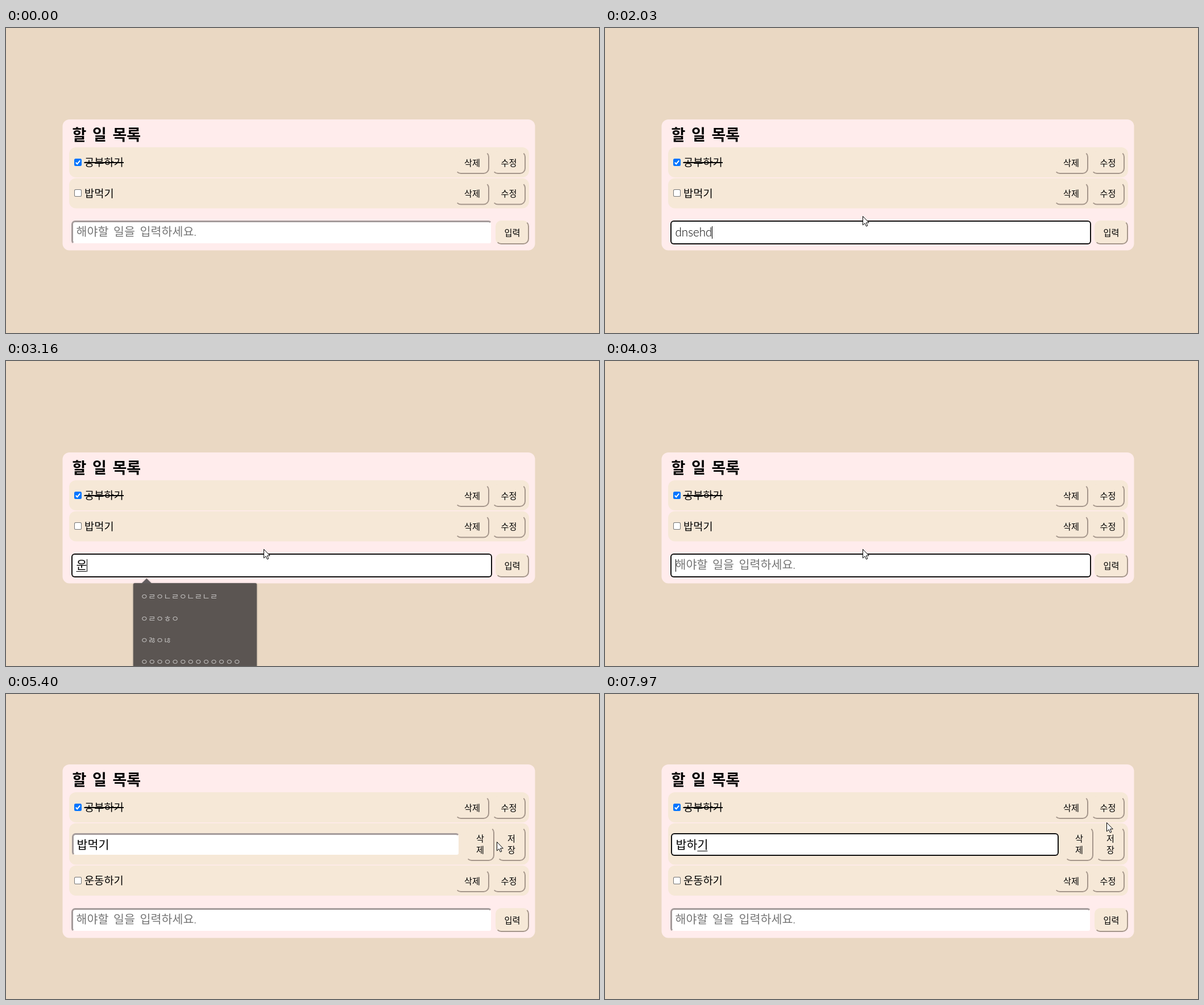
An HTML page with a canvas for the animation above (8 s loop, 1043 by 537 pixels).

```html
<!DOCTYPE html>
<html lang="ko">
<head>
<meta charset="utf-8">
<title>할 일 목록</title>
<style>
html, body { margin: 0; width: 100%; height: 100%; overflow: hidden; background: #ead8c3; }
canvas { display: block; }
</style>
</head>
<body>
<canvas id="stage" width="1043" height="537"></canvas>
<script>
const ctx = document.getElementById('stage').getContext('2d');
const LOOP = 8000;
const HANGUL = '"Noto Sans CJK KR", "Noto Sans CJK JP", "Noto Sans CJK", sans-serif';
const PAPER = '#f6e8d7', SHADE = '#a5968b', INK = '#000';

// [time, text, composing last syllable, caret hidden]
const newTask = [
  [940, ''], [1665, 'dn'], [1740, 'dns'], [1830, 'dnse'], [1900, 'dnseh'], [2030, 'dnsehd'],
  [2290, 'dnseh'], [2360, 'dnse'], [2430, 'dns'], [2500, 'dn'], [2570, 'd'], [2692, '', false, true],
  [2860, 'ㅇ', true], [2990, '우', true], [3092, '운', true], [3300, '운ㄷ', true], [3430, '운도', true],
  [3560, '운동', true], [3660, '운동ㅎ', true], [3740, '운동하', true], [3820, '운동학', true],
  [3900, '운동하기', true], [4025, '']
];
const rename = [
  [5395, '밥먹기'], [6300, '밥먹기'], [6830, '밥먹'], [6900, '밥'],
  [7170, '밥ㅎ', true], [7270, '밥하', true], [7370, '밥하기', true]
];
const BLUR = 5330, ADD = 4160, EDIT = 5395, REFOCUS = 6230;

// [open, close, fade in, fade out, width, entries]
const latin = ['dfdf', 'dfdff', 'dgdg', 'dghfgfdgdg'];
const jamo = ['ㅇㄹㅇㄴㄹㅇㄴㄹㄴㄹ', 'ㅇㄹㅇㅎㅇ', 'ㅇㅀㅇㄶ', 'ㅇ'.repeat(13)];
const recent = ['공부하기', '밥먹기', 'ㅇㄹㅇㅎㅇ', 'ㅇㄹㅇㄴㄹㅇㄴㄹㄴㄹ'];
const popups = [
  [1000, 1663, 200, 1, 184, recent],
  [1664, 1700, 1, 200, 116, latin],
  [2570, 2692, 100, 200, 116, latin],
  [2860, 3092, 150, 200, 221, jamo]
];

const pointer = [
  [70, 762, 487], [470, 409, 367], [940, 409, 367], [1200, 453, 331], [4560, 453, 331],
  [5330, 863, 260], [5410, 863, 260], [6020, 780, 264], [7780, 780, 264], [7960, 882, 226]
];

function box(x, y, w, h, r, fill) {
  ctx.beginPath();
  ctx.roundRect(x, y, w, h, r);
  ctx.fillStyle = fill;
  ctx.fill();
}

// Strokes two sides of a rounded box, clockwise from the middle of a corner (0 = top right).
function bevel(x, y, w, h, r, corner, width, color) {
  ctx.beginPath();
  for (let i = 0; i < 3; i++) {
    const k = (corner + i) % 4, angle = (k - 1) * Math.PI / 2;
    const cx = k < 2 ? x + w - r : x + r;
    const cy = k === 1 || k === 2 ? y + h - r : y + r;
    ctx.arc(cx, cy, r, angle + (i === 0 ? Math.PI / 4 : 0), angle + Math.PI / (i === 2 ? 4 : 2));
  }
  ctx.lineWidth = width;
  ctx.strokeStyle = color;
  ctx.stroke();
}

function setFont(size, weight = 300, first = 'Lato') {
  ctx.font = `${weight} ${size}px ${first}, ${HANGUL}`;
  ctx.wordSpacing = size * 0.15 + 'px';
}

function label(text, x, centerY, size, { weight, first, color = INK, align = 'left' } = {}) {
  setFont(size, weight, first);
  ctx.textAlign = align;
  ctx.fillStyle = color;
  ctx.fillText(text, x, centerY + size * 0.37);
}

function button(text, x, y, w, h) {
  box(x, y, w, h, 10, PAPER);
  bevel(x + 1, y + 1, w - 2, h - 2, 9, 0, 2, SHADE);
  const lines = h > 50 ? [...text] : [text];
  lines.forEach((line, i) =>
    label(line, x + w / 2, y + h / 2 + (i - (lines.length - 1) / 2) * 20, 15.2, { align: 'center' }));
}

function field(x, y, w, h, focused, edits, t, placeholder) {
  if (focused) {
    box(x, y, w, h, 6, '#101010');
    box(x + 2, y + 2, w - 4, h - 4, 4, '#fff');
  } else {
    box(x + 3, y + 3, w - 5, h - 5, 3, '#fff');
    bevel(x + 1.5, y + 1.5, w - 3, h - 3, 5, 2, 3, '#a49b9b');
  }
  const [since, text, composing, caretHidden] = edits.findLast(e => e[0] <= t) || [0, ''];
  const left = x + 8.5;
  if (!text) label(placeholder, left, y + 19.5, 20.6, { color: '#757575' });
  else label(text, left, y + 20.5, 20.6);
  setFont(20.6);
  const right = left + ctx.measureText(text).width;
  ctx.fillStyle = INK;
  if (composing) {
    const start = left + ctx.measureText(text.slice(0, -1)).width;
    ctx.fillRect(start, y + 31, right - start - 1, 1);
  }
  if (focused && !caretHidden && (t - since) % 1060 < 530) {
    ctx.fillRect(Math.round(right), y + 10, 1, 22);
  }
}

function checkbox(x, y, checked) {
  box(x, y, 13, 13, 2.5, checked ? '#0075ff' : '#767676');
  if (!checked) return box(x + 1, y + 1, 11, 11, 1.5, '#fff');
  ctx.beginPath();
  ctx.moveTo(x + 2.8, y + 6.8);
  ctx.lineTo(x + 5.3, y + 9.4);
  ctx.lineTo(x + 10.2, y + 3.4);
  ctx.lineWidth = 2;
  ctx.strokeStyle = '#fff';
  ctx.stroke();
}

function task(text, y, done) {
  box(111, y, 809, 53, 12, PAPER);
  checkbox(120, Math.floor(y + 20), done);
  label(text, 138, y + 26.5, 18.7);
  if (done) {
    ctx.fillRect(137.5, y + 26, 69.5, 2);
  }
  button('삭제', 790, y + 7, 60, 40);
  button('수정', 855, y + 7, 59, 40);
}

function editor(y, t) {
  box(111, y, 809, 73, 12, PAPER);
  field(116, Math.round(y + 17), 682, 40, t >= REFOCUS, rename, t, '');
  button('삭제', 809, y + 6.5, 50, 60);
  button('저장', 864, y + 6.5, 50, 60);
}

function popup(t, [open, close, fadeIn, fadeOut, width, entries]) {
  const alpha = Math.min(1, (t - open) / fadeIn, 1 - (t - close) / fadeOut);
  if (alpha <= 0) return;
  const scale = 1 - 0.045 * (1 - alpha), cx = 222 + width / 2;
  ctx.save();
  ctx.globalAlpha = alpha;
  ctx.translate(cx, 457);
  ctx.scale(scale, scale);
  ctx.translate(-cx, -457);
  ctx.shadowColor = 'rgba(0,0,0,.3)';
  ctx.shadowBlur = 3;
  ctx.beginPath();
  ctx.roundRect(222, 390, width, 190, 3);
  ctx.moveTo(237.5, 390);
  ctx.lineTo(246, 381.5);
  ctx.lineTo(254.5, 390);
  ctx.fillStyle = '#29292c';
  ctx.fill();
  ctx.shadowColor = 'transparent';
  entries.forEach((entry, i) =>
    label(entry, 235, 414 + 39 * i, /[a-z]/.test(entry) ? 14.5 : 15,
      { weight: 400, first: 'Roboto', color: '#f2f2f2' }));
  ctx.restore();
}

function drawPointer(t, inputTop) {
  if (t < pointer[0][0]) return;
  const i = pointer.findLastIndex(p => p[0] <= t);
  const [t0, x0, y0] = pointer[i], [t1, x1, y1] = pointer[i + 1] || [LOOP, x0, y0];
  const k = (t - t0) / (t1 - t0), s = k * k * (3 - 2 * k);
  const x = Math.round(x0 + (x1 - x0) * s), y = Math.round(y0 + (y1 - y0) * s);
  const overNew = x > 115 && x < 855 && y > inputTop && y < inputTop + 41;
  const overEdit = t >= EDIT && x > 116 && x < 798 && y > 245 && y < 285;
  if (overNew || overEdit) {
    ctx.fillStyle = INK;
    ctx.fillRect(x, y - 8, 1, 17);
    for (const dy of [-9, 9]) {
      ctx.fillRect(x - 3, y + dy, 3, 1);
      ctx.fillRect(x + 1, y + dy, 3, 1);
    }
    return;
  }
  ctx.save();
  ctx.translate(x + 0.5, y + 0.5);
  ctx.fillStyle = '#fff';
  ctx.strokeStyle = INK;
  ctx.lineWidth = 1;
  const arrow = new Path2D('M0 0V15.5L3.6 12.2 6 17.6 8.4 16.5 6 11.3H10.8Z');
  ctx.fill(arrow);
  ctx.stroke(arrow);
  ctx.restore();
}

function draw(t) {
  const editing = t >= EDIT, three = t >= ADD;
  const top = editing ? 124 : three ? 134 : 161;
  const height = editing ? 305 : three ? 285 : 230;
  const inputTop = top + height - 52;

  ctx.fillStyle = '#ead8c3';
  ctx.fillRect(0, 0, 1043, 537);
  box(99.5, top, 831, height + 0.5, 12, '#ffecec');
  label('할 일 목록', 116.5, top + 27.5, 27, { weight: 700 });

  const first = top + 49, second = first + 54.5;
  task('공부하기', first, true);
  if (editing) editor(second, t);
  else task('밥먹기', second, false);
  if (three) task('운동하기', second + (editing ? 74.5 : 54.5), false);

  field(115, inputTop, 740, 42, t >= 940 && t < BLUR, newTask, t, '해야할 일을 입력하세요.');
  button('입력', 861, inputTop, 59, 42);
  popups.forEach(p => popup(t, p));
  drawPointer(t, inputTop);
}

const start = performance.now();
function frame() {
  draw((performance.now() - start) % LOOP);
  requestAnimationFrame(frame);
}
frame();
</script>
</body>
</html>
```
